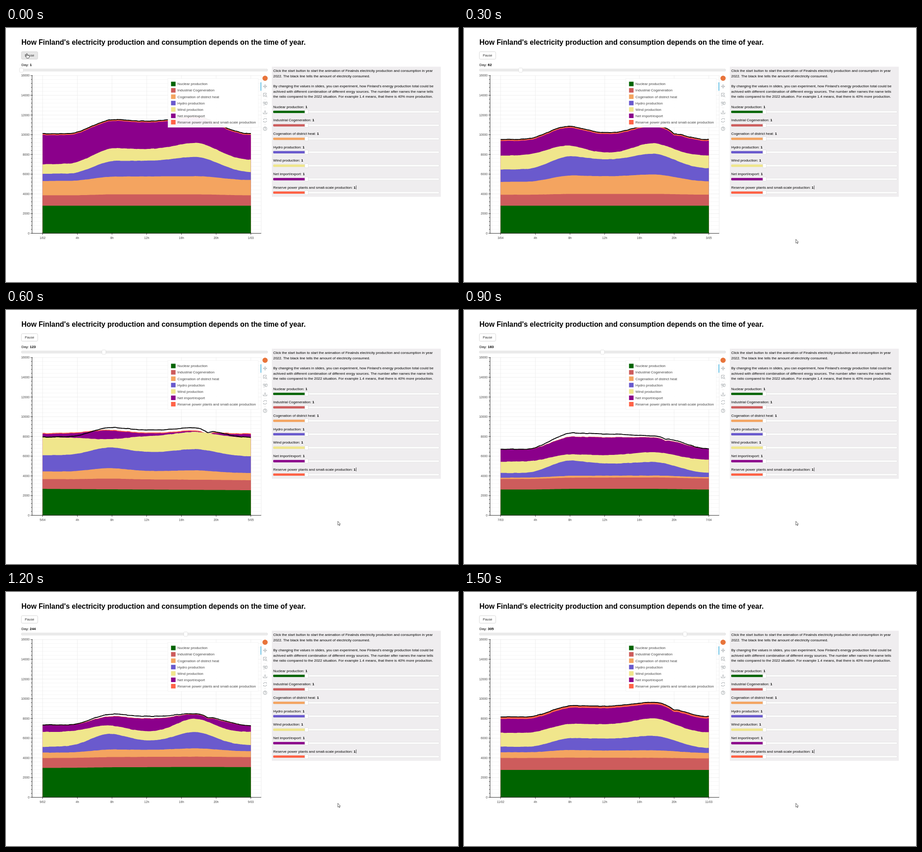
An HTML page for the animation above (1.8 s loop, 998 by 561 pixels).

```html
<!DOCTYPE html>
<html lang="en">
<head>
<meta charset="utf-8">
<title>Electricity production by day</title>
<style>
  html, body { margin: 0; width: 100%; height: 100%; overflow: hidden; background: #fff; }
  svg { display: block; width: 100vw; height: 100vh; }
  text { font: 7.93px "Liberation Sans", Arial, sans-serif; fill: #000; white-space: pre; }
  .title { font-size: 15.86px; font-weight: bold; }
  .tick { font-size: 6.7px; fill: #444; }
  .button { font-size: 7.4px; fill: #333; }
  .legend { fill: #444; }
  .bold { font-weight: bold; }
  .icon { fill: none; stroke: #a1a6a9; stroke-width: 1; }
</style>
</head>
<body>
<svg id="stage" viewBox="0 0 998 561"></svg>
<script>
const HOLD = 300, DAY_STEP = 60.8;
const LEFT = 80.8, RIGHT = 540.6, BASE = 453.5, SAMPLES = 184;
const SOURCES = [
  ['Nuclear production', '#006400'],
  ['Industrial Cogeneration', '#cd5c5c'],
  ['Cogenation of district heat', '#f4a460'],
  ['Hydro production', '#6a5acd'],
  ['Wind production', '#f0e68c'],
  ['Net import/export', '#8b008b'],
  ['Reserve power plants and small-scale production', '#ff6347'],
];

const ramp = (from, to, h) => {
  const t = Math.max(0, Math.min(1, (h - from) / (to - from)));
  return t * t * (3 - 2 * t);
};
const peak = (center, h) => Math.exp(-(((h - center) / 3) ** 2));

// Daily curve: night level, drift over the day, daytime rise, morning and evening peaks
const curve = (night, drift = 0, daytime = 0, morning = 0, evening = 0) => h =>
  night + drift * h / 24 + daytime * ramp(3, 8.5, h) * (1 - ramp(17.5, 24, h)) +
  morning * peak(7.5, h) + evening * peak(17.5, h);

// Stage heights above the axis. gap: consumption above the stack; dip: sudden drop at sunset.
const DAYS = [
  {
    levels: [curve(61), curve(84, 0, 2), curve(115.7, 2, 9), curve(131.5, 4, 26.5, 1, 8),
      curve(152.5, 10, 28, 4.5, 12)],
    used: curve(220, 0, 27, 5, 11), gap: curve(0), reserve: 3, dip: { hour: 20, depth: 0 },
  },
  {
    levels: [curve(61), curve(85.3, 0, 1.7), curve(113.7, 1.3, 11.5, 2.5, 4), curve(141, 2.5, 20, 9, 13),
      curve(172, 0, 4, 18, 23)],
    used: curve(207, 0, 13, 17, 20), gap: curve(0.7), reserve: 2.6, dip: { hour: 20, depth: 7 },
  },
  {
    levels: [curve(58.4, -2.9), curve(80, -2.5, 0.5, 1.5), curve(97, -3.7, 2.5, 6, 2.5), curve(133, -2.5, 7, 11, 8),
      curve(172.5, -0.5, 3, -7, 9)],
    used: curve(173, -1, 15, 7, 6), gap: curve(-8.8, 0, 14.5), reserve: 1.8, dip: { hour: 19, depth: 8 },
  },
  {
    levels: [curve(57, 0, 1.4), curve(80.2, 1.3, 2.5), curve(83.2, 1.3, 3.7), curve(93.5, 0.5, 20, 8, 4),
      curve(118.5, 4.5, 12, 3, 6)],
    used: curve(146, 1, 33, 3, -4), gap: curve(0, 0, 7, 1, -4), reserve: 0.7, dip: { hour: 19, depth: 5 },
  },
  {
    levels: [curve(65, 1.7, 0.8), curve(86.8, 2, 1.5), curve(98.7, 3.3, 4.5, 1.5, 2.5), curve(111.5, 4, 10, 18, 20),
      curve(144.5, 0, -1, 15, 30)],
    used: curve(160, -1.5, 19, 6, 7), gap: curve(0, 0, 4.5, 0, -3.5), reserve: 0.9, dip: { hour: 19, depth: 5 },
  },
  {
    levels: [curve(60.5), curve(87, -1, 1), curve(99.7, -1.7, 4.5, 1, 1), curve(112, -3, 19, 1, 7),
      curve(142.5, 1, 18, 2, 13)],
    used: curve(177.5, 1, 23, 2, 9), gap: curve(0), reserve: 4.5, dip: { hour: 20, depth: 6 },
  },
];

const stage = document.getElementById('stage');

function add(name, attrs, text) {
  const node = document.createElementNS('http://www.w3.org/2000/svg', name);
  for (const key in attrs) node.setAttribute(key, attrs[key]);
  if (text !== undefined) node.textContent = text;
  stage.appendChild(node);
  return node;
}
const rect = (x, y, width, height, fill, more) => add('rect', { x, y, width, height, fill, ...more });
const path = (d, attrs) => add('path', { d, ...attrs });
const line = (d, stroke, width = 0.7) => path(d, { stroke, 'stroke-width': width, fill: 'none' });
const label = (x, y, text, cls = '', anchor = 'start') =>
  add('text', { x, y, class: cls, 'text-anchor': anchor }, text);

function valueLabel(x, y, name, value) {
  const node = label(x, y, name + ': ');
  const bold = document.createElementNS(node.namespaceURI, 'tspan');
  bold.setAttribute('class', 'bold');
  bold.textContent = value;
  node.appendChild(bold);
  return bold;
}

const handle = (x, y, width, height) => rect(x - width / 2, y - height / 2, width, height, '#fff',
  { rx: 2, stroke: '#d0d0d0', 'stroke-width': 0.6 });

const hourX = hour => LEFT + (RIGHT - LEFT) * hour / 24;

// Seeded noise held over a few samples, for the stepped look of measured data
function wobble(i, seed) {
  const v = Math.sin(Math.floor(i / 3) * 12.9898 + seed * 78.233) * 43758.5453;
  return v - Math.floor(v) - 0.5;
}

function dateLabel(day) {
  const date = new Date(Date.UTC(2022, 0, 1 + day));
  return date.getUTCMonth() + 1 + '/' + String(date.getUTCDate()).padStart(2, '0');
}

function prepare(data, index) {
  const edges = SOURCES.map(() => []), used = [];
  const { hour, depth } = data.dip;
  for (let i = 0; i <= SAMPLES; i++) {
    const h = 24 * i / SAMPLES;
    const point = height => hourX(h).toFixed(1) + ' ' + (BASE - height).toFixed(1);
    const heights = data.levels.map((level, k) => level(h) + wobble(i, index + k) * k * 0.22);
    const need = data.used(h) - depth * Math.exp(-Math.abs(h - hour) / 0.5) + wobble(i, index + 9) * 1.1;
    const top = Math.max(need - data.gap(h), heights[4]);
    heights.push(Math.max(top - data.reserve, heights[4]), top);
    heights.forEach((height, k) => edges[k].push(point(height)));
    used.push(point(need));
  }
  data.day = Math.round(1 + DAY_STEP * index);
  data.areas = edges.map(points => `M${LEFT} ${BASE}L${points.join('L')}L${RIGHT} ${BASE}Z`);
  data.line = 'M' + used.join('L');
}
DAYS.forEach(prepare);

label(34, 37, "How Finland's electricity production and consumption depends on the time of year.", 'title');
const button = rect(34, 52.3, 36, 16.6, '#fff', { rx: 2.4, stroke: '#ccc', 'stroke-width': 0.8 });
label(52, 63.3, 'Pause', 'button', 'middle');
const dayValue = valueLabel(34, 83.6, 'Day', '');
rect(34, 90.6, 543.5, 4.6, '#ececec', { rx: 1.5, stroke: '#d3d3d3', 'stroke-width': 0.6 });
const dayHandle = handle(34, 93, 8.6, 9.6);

// Grid, filled areas and axes
rect(57.5, 105, 506, 348.5, '#fff', { stroke: '#e5e5e5', 'stroke-width': 0.7 });
const level = value => BASE - value * 348.5 / 16000;
for (let v = 400; v < 16000; v += 400) line(`M57.5 ${level(v)}H563.5`, v % 2000 ? '#f1f1f1' : '#e5e5e5');
for (let h = 0; h <= 24; h += 4) line(`M${hourX(h)} 105V${BASE}`, '#e9e9e9');

const areas = [];
for (let k = SOURCES.length - 1; k >= 0; k--) areas[k] = path('', { fill: SOURCES[k][1] });
const usedLine = path('', { fill: 'none', stroke: '#000', 'stroke-width': 1.9, 'stroke-linejoin': 'round' });

line(`M57.5 105V${BASE}H563.5`, '#000', 0.8);
for (let v = 0; v <= 16000; v += 400) {
  const major = v % 2000 === 0, y = level(v);
  line(`M${major ? 54 : 55.2} ${y}H${major ? 59 : 57.5}`, '#000');
  if (major) label(52, y + 2.4, v, 'tick', 'end');
}
const dateLabels = [];
for (let h = 0; h <= 24; h += 4) {
  line(`M${hourX(h)} 452.3V457.2`, '#000');
  const node = label(hourX(h), 466.4, h + 'h', 'tick', 'middle');
  if (h % 24 === 0) dateLabels.push(node);
}

// Legend
rect(357.5, 111.5, 199.5, 108, '#fff', { 'fill-opacity': 0.95, stroke: '#e5e5e5', 'stroke-opacity': 0.6, 'stroke-width': 0.7 });
SOURCES.forEach(([name, color], k) => {
  const y = 123.6 + k * 14.07;
  rect(364.4, y - 5, 10, 10, color);
  label(378.5, y + 2.8, name, 'legend');
});

// Toolbar
add('circle', { cx: 572, cy: 111, r: 5.8, fill: '#e8743b' });
line('M562.8 120V138.5', '#26aae1', 1.3);
[
  'M568 129H576M572 125V133M570.7 126.3L572 125L573.3 126.3M570.7 131.7L572 133L573.3 131.7M569.3 127.7L568 129L569.3 130.3M574.7 127.7L576 129L574.7 130.3',
  'M568.3 151V144H575V146M568.3 151H570M575.2 149.3a2.1 2.1 0 1 0-4.2 0a2.1 2.1 0 1 0 4.2 0M574.7 150.8L576.6 152.8',
  'M568 165a1.8 1.8 0 1 1 3.6 0a1.8 1.8 0 1 1-3.6 0M571 166.5L573 169.5M573 163.5H576.5V167.5a1.7 1.7 0 0 1-3.5 0ZM568.5 170H571',
  'M568 186.5V189.5H576V186.5M572 181.5V187M570 185L572 187L574 185',
  'M568.4 203a3.7 3.7 0 0 1 7-1.2V200M575.6 204.8a3.7 3.7 0 0 1-7 1.2V208',
  'M576 222.4a4 4 0 1 0-8 0a4 4 0 1 0 8 0M570.7 221.4a1.3 1.3 0 1 1 1.3 1.4V223.6M572 224.3V225',
].forEach(d => path(d, { class: 'icon' }));
for (let k = 0; k < 4; k++) line(`M569.5 ${157.8 + k * 18.5}H574.5`, '#e2e2e2');

// Side panel
rect(587, 85.5, 373, 287.3, '#efedef');
[
  'Click the start button to start the animation of Finalnds electricity production and consumption in year',
  '2022. The black line tells the amount of electricity consumed.',
  '',
  "By changing the values in slides, you can experiment, how Finland's energy production total could be",
  'achived with different combination of different enrgy sources. The number after names the name tells',
  'the ratio compared to the 2022 situation. For example 1.4 means, that there is 40% more production.',
].forEach((text, k) => label(590, 97.1 + k * 11.43, text));
SOURCES.forEach(([name, color], k) => {
  const y = 176.6 + k * 29.72;
  valueLabel(590, y, name, 1);
  rect(590, y + 6.3, 366.5, 4.7, '#fcfcfc', { rx: 1.6, stroke: '#dadada', 'stroke-width': 0.6 });
  rect(590, y + 6.1, 72, 5.1, color, { rx: 1.4 });
  handle(663.6, y + 8.6, 7.8, 9.4);
});
line('M773.2 347.8V356.4', '#222', 0.8);

// Pointers
const arrow = path('M732.7 466.6V475.2L734.6 473.5L736 476.4L737.3 475.8L736 473H738.4Z',
  { fill: '#fff', stroke: '#222', 'stroke-width': 0.7 });
const hand = path('M45.2 57.3q0-1 .9-1t.9 1v3l3.6.7q1.2.3 1 1.6l-.5 2.4-.9 1.7h-4.4l-2.3-3.6q-.5-1 .3-1.2t1.4.8Z',
  { fill: '#fff', stroke: '#222', 'stroke-width': 0.8 });

let shown = -1;
function render(time) {
  const index = Math.floor(time / HOLD) % DAYS.length;
  if (index === shown) return;
  shown = index;
  const data = DAYS[index], start = index === 0;
  areas.forEach((area, k) => area.setAttribute('d', data.areas[k]));
  usedLine.setAttribute('d', data.line);
  dateLabels.forEach((node, k) => { node.textContent = dateLabel(data.day + k); });
  dayValue.textContent = data.day;
  dayHandle.setAttribute('x', 34 + (data.day - 1) * 1.493 - 4.3);
  button.setAttribute('fill', start ? '#e6e6e6' : '#fff');
  hand.style.display = start ? '' : 'none';
  arrow.style.display = start ? 'none' : '';
}

const began = performance.now();
function tick() {
  render(performance.now() - began);
  requestAnimationFrame(tick);
}
tick();
</script>
</body>
</html>
```
